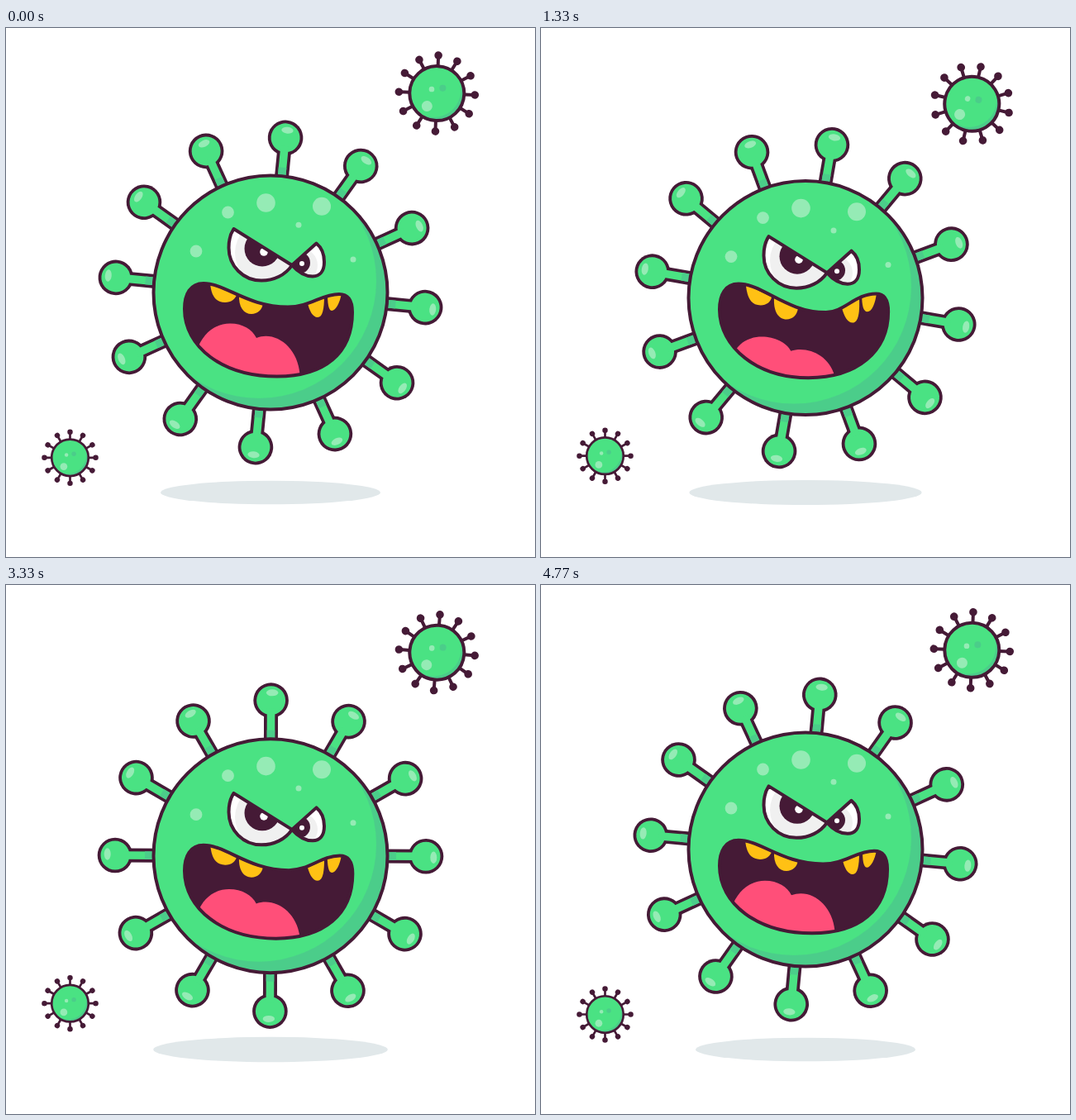
Recreate the animation shown at these times as an HTML page. Size 640x640 px, loop 4810 ms.

```html
<!DOCTYPE html>
<html lang="en">
<head>
<meta charset="utf-8">
<title>Grumpy virus</title>
<style>
  html, body { margin: 0; width: 100%; height: 100%; overflow: hidden; background: #fff; }
  svg { display: block; width: 100%; height: 100%; }
  .green { fill: #4ae283; }
  .shade { fill: #4bcd8a; }
  .light { fill: #95ebb5; }
  .dark { fill: #451a36; }
  .line { fill: none; stroke: #451a36; stroke-width: 4; stroke-linejoin: round; stroke-linecap: round; }
  .tooth { fill: #ffc114; }
  .tongue { fill: #ff4f79; }
</style>
</head>
<body>
<svg viewBox="0 0 640 640">
  <defs>
    <clipPath id="ball"><circle r="141.5"/></clipPath>
    <clipPath id="miniBall"><circle r="33"/></clipPath>
    <clipPath id="eyeL"><path id="eyeLShape" d="M275.5 -77 L346 -33 C338 -21 324 -14.5 309 -14.5 C287 -14.5 269.5 -32 269.5 -54 C269.5 -63 271.5 -71 275.5 -77Z"/></clipPath>
    <clipPath id="eyeR"><path id="eyeRShape" d="M346 -33 L375.5 -59.5 C381 -55 385 -47 385 -37 C385 -26 380 -19.5 371 -19.5 C361 -19.5 353 -25 346 -33Z"/></clipPath>
    <clipPath id="mouthClip"><path id="mouthClipPath"/></clipPath>
    <g id="mini">
      <g id="miniSpikes"></g>
      <g clip-path="url(#miniBall)">
        <circle class="shade" r="33"/>
        <circle class="green" cx="-4" cy="-4" r="33"/>
      </g>
      <circle class="line" r="33"/>
      <circle class="light" cx="-11.3" cy="15.9" r="6.5"/>
      <circle class="light" cx="-6.5" cy="-4.8" r="3.3"/>
      <circle class="shade" cx="6.8" cy="-6.7" r="4"/>
    </g>
  </defs>

  <ellipse id="shadow" cx="320" cy="562" fill="#e1e8ea"/>

  <g id="hero">
    <g id="spikes"></g>
    <g transform="translate(320 0)">
      <g clip-path="url(#ball)">
        <circle class="shade" r="142"/>
        <circle class="green" cx="-14" cy="-14" r="142"/>
      </g>
      <circle class="line" r="141.5"/>
    </g>
    <g id="spots"></g>

    <g id="eyes">
      <g clip-path="url(#eyeL)">
        <use href="#eyeLShape" fill="#fff"/>
        <circle cx="316" cy="-48" r="39" fill="#f0f0f0"/>
        <circle class="dark" cx="310" cy="-53" r="21.5"/>
        <circle cx="312" cy="-49" r="4.8" fill="#fff"/>
      </g>
      <g clip-path="url(#eyeR)">
        <use href="#eyeRShape" fill="#fff"/>
        <circle cx="357" cy="-33" r="20" fill="#f0f0f0"/>
        <circle class="dark" cx="355" cy="-36" r="13"/>
        <circle cx="358" cy="-35" r="3" fill="#fff"/>
      </g>
      <use href="#eyeLShape" class="line"/>
      <use href="#eyeRShape" class="line"/>
    </g>

    <path id="mouth" class="dark"/>
    <g id="inside" clip-path="url(#mouthClip)"></g>
    <path id="lips" class="line"/>
  </g>

  <use id="miniA" href="#mini"/>
  <use id="miniB" href="#mini"/>
</svg>
<script>
const LOOP = 4810;
const $ = id => document.getElementById(id);

function add(parent, tag, attrs) {
  const el = document.createElementNS("http://www.w3.org/2000/svg", tag);
  for (const k in attrs) el.setAttribute(k, attrs[k]);
  return parent.appendChild(el);
}

// Twelve spikes on the big ball and on the small one
for (let a = 0; a < 360; a += 30) {
  const g = add($("spikes"), "g", { transform: `rotate(${a})` });
  add(g, "rect", { class: "dark", x: -8.5, y: -178, width: 17, height: 48 });
  add(g, "circle", { class: "dark", cy: -188, r: 21.3 });
  add(g, "circle", { class: "green", cy: -188, r: 17.5 });
  add(g, "rect", { class: "green", x: -4.8, y: -178, width: 9.6, height: 48 });
  add(g, "rect", { class: "shade", x: -4.8, y: -152, width: 9.6, height: 20 });
  add(g, "ellipse", { class: "light", cx: 1.5, cy: -197.3, rx: 7.2, ry: 4 });

  const s = add($("miniSpikes"), "g", { transform: `rotate(${a})` });
  add(s, "path", { class: "line", d: "M0 -33V-45" });
  add(s, "circle", { class: "dark", cy: -46, r: 4.8 });
}

for (const [cx, cy, r] of [
  [314.5, -108.5, 11.3], [382, -104.3, 11], [268.5, -97, 7.4],
  [354, -81.7, 3.5], [230, -50, 7.4], [420, -40, 3.5]
]) add($("spots"), "circle", { class: "light", cx, cy, r });

// Each mouth part: its open pose and its narrow pose
const mouth = [
  "M216 20 C216 2 223 -11 239 -11 C266 -11 292 17.5 341 17.5 C367 17.5 382 2 403 2 C414 2 419 9 419 24 C419 74 385 101.5 328 101.5 C262 101.5 216 66 216 20Z",
  "M216 12 C216 -6 223 -19 239 -19 C270 -19 298 17.5 346 17.5 C366 17.5 380 -7.5 406 -7.5 C416 -7.5 420.5 0 420.5 14 C420.5 62 382 95 322 95 C262 95 216 58 216 12Z"
];
const parts = [
  ["tongue",
    "M230 72 C238 48 254 37.5 271 37.5 C287 37.5 298 45 303 55 C326 46 353 66 355.5 99 L355 115 L230 115Z",
    "M236 62 C243 53 254 50 266 50 C281 50 297 57 302 67 C322 62 346 70 355 92 L355 112 L236 112Z"],
  ["tooth",
    "M247 -12 C248 4 254 12 265 12 C272 12 278 8 279 2Z",
    "M248 -18 C250 0 255 7.8 266 7.8 C273 7.8 278 4 279 -2Z"],
  ["tooth",
    "M282 2 C281 18 288 26 297 26 C304 26 310 21 311 13Z",
    "M282 -1 C281 16 287 26 297 26 C304 26 310 21 311 12Z"],
  ["tooth",
    "M365 13 C367 22 371 30 377 30 C383 30 385 20 385 3Z",
    "M364 13 C367 23 371 30 377 30 C384 30 386 18 385 0Z"],
  ["tooth",
    "M389 2 C389 12 390 22 394 22 C399 22 404 12 406 1Z",
    "M388 -4 C388 8 390 15 395 15 C401 15 405 4 406 -9Z"]
].map(([cls, a, b]) => ({ el: add($("inside"), "path", { class: cls }), a, b }));

function mix(a, b, q) {
  const nums = b.match(/-?[\d.]+/g);
  let i = 0;
  return a.replace(/-?[\d.]+/g, n => (+n + (nums[i++] - n) * q).toFixed(2));
}

// Smooth swing 0 -> 1 -> 0, lowest at time low
function swing(t, low, period) {
  const u = (((t - low) / period) % 1 + 1) % 1;
  const s = 1 - Math.abs(2 * u - 1);
  return s * s * (3 - 2 * s);
}

const move = (id, value) => $(id).setAttribute("transform", value);

function draw(t) {
  const drop = swing(t, 0, LOOP);
  move("hero", `translate(0 ${320 + 11.4 * drop})`);
  $("shadow").setAttribute("rx", 133 + 13.2 * drop);
  $("shadow").setAttribute("ry", 14.3 + 1.4 * drop);
  move("spikes", `translate(320 0) rotate(${10 * swing(t, 3525, LOOP)})`);

  const bite = swing(t, 0, LOOP / 6);
  move("eyes", `translate(0 ${3 * Math.pow(bite, 0.6)})`);
  const shape = mix(...mouth, bite);
  for (const id of ["mouth", "mouthClipPath", "lips"]) $(id).setAttribute("d", shape);
  for (const p of parts) p.el.setAttribute("d", mix(p.a, p.b, bite));

  const a = swing(t, 4215, LOOP);
  move("miniA", `translate(521.3 ${76.5 + 17 * a}) rotate(${15 * a})`);
  const b = swing(t, 2945, LOOP);
  move("miniB", `translate(77.5 ${505 + 17 * b}) scale(.675)`);
}

function frame() {
  draw(performance.now() % LOOP);
  requestAnimationFrame(frame);
}
frame();
</script>
</body>
</html>
```
